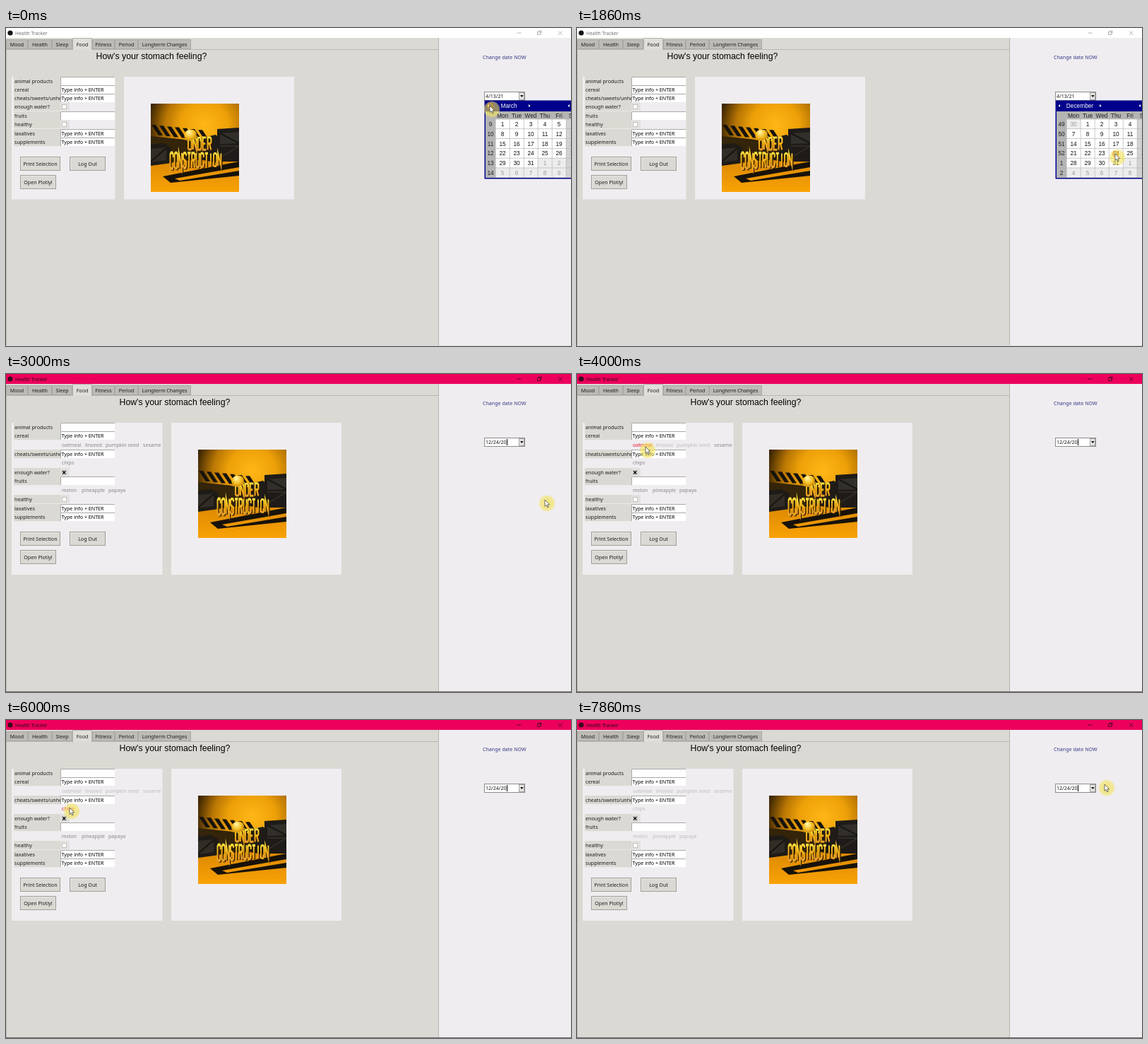
Write an HTML page with a canvas that moves like this. It is 800 by 450 pixels and loops after 8 s.

```html
<!DOCTYPE html>
<html lang="en">
<head>
<meta charset="utf-8">
<title>Health Tracker</title>
<style>
  html, body { margin: 0; width: 100%; height: 100%; overflow: hidden; background: #efedf0; }
  canvas { display: block; }
</style>
</head>
<body>
<canvas id="stage" width="800" height="450"></canvas>
<script>
const ctx = document.getElementById('stage').getContext('2d');
const LOOP = 8000, STEPS_PER_SECOND = 7;
const DATE_CHOSEN = 18;
const UI = '"Noto Sans", "Open Sans", sans-serif';
const ARIAL = '"Liberation Sans", Arial, sans-serif';
const GREY = '#dad9d3', PANEL = '#efedf0', INK = '#1c1c1c', NAVY = '#00008b';

function rect(x, y, w, h, fill, border) {
  ctx.fillStyle = fill;
  ctx.fillRect(x, y, w, h);
  if (border) {
    ctx.strokeStyle = border;
    ctx.lineWidth = 1;
    ctx.strokeRect(x + .5, y + .5, w - 1, h - 1);
  }
}

// y is the vertical middle of the capitals
function text(str, x, y, { size = 7.1, color = INK, align = 'left', family = UI } = {}) {
  ctx.font = `${size}px ${family}`;
  ctx.textAlign = align;
  ctx.fillStyle = color;
  ctx.fillText(str, x, y + size * .36);
}

function poly(points, fill) {
  ctx.beginPath();
  for (let i = 0; i < points.length; i += 2) ctx.lineTo(points[i], points[i + 1]);
  ctx.closePath();
  ctx.fillStyle = fill;
  ctx.fill();
}

function line(points, color, width = 1) {
  ctx.beginPath();
  for (let i = 0; i < points.length; i += 2) ctx.lineTo(points[i], points[i + 1]);
  ctx.strokeStyle = color;
  ctx.lineWidth = width;
  ctx.stroke();
}

// Pointer tip: [step, x, y]
const route = [
  [0, 685, 110], [8, 685, 110], [11, 768, 182], [13, 762, 178], [21, 763, 178],
  [24, 262, 122], [25, 165, 102], [26, 125, 103], [28, 97, 103], [32, 97, 103],
  [33, 125, 103], [34, 160, 104], [36, 191, 107], [38, 191, 107], [40, 92, 124],
  [42, 90, 124], [44, 90, 161], [45, 95, 161], [46, 122, 161], [47, 152, 161],
  [49, 162, 161], [53, 755, 105], [55, 747, 91]
];

function pointerAt(step) {
  const next = route.findIndex(key => key[0] >= step);
  if (next <= 0) return route[0].slice(1);
  const [s0, x0, y0] = route[next - 1], [s1, x1, y1] = route[next];
  const k = (step - s0) / (s1 - s0), ease = k * k * (3 - 2 * k);
  return [x0 + (x1 - x0) * ease, y0 + (y1 - y0) * ease];
}

// Words offered below the entries: [word, left, right, middle]
const words = [
  ['oatmeal', 79, 106, 100], ['linseed', 112, 136, 100],
  ['pumpkin seed', 141, 188, 100], ['sesame', 194, 219, 100],
  ['chips', 79, 97, 125],
  ['melon', 79, 100, 164], ['pineapple', 107, 139, 164], ['papaya', 145, 169, 164]
];

// Hovered words are red, and stay pale once left
function wordColor([, left, right, mid], step) {
  const hit = s => {
    const [x, y] = pointerAt(s);
    return x >= left - 3 && x <= right + 1 && Math.abs(y - mid) <= 7;
  };
  if (hit(step)) return '#e8102c';
  for (let s = DATE_CHOSEN; s < step; s++) if (hit(s)) return '#bdbcbe';
  return '#878689';
}

function drawWindow(active) {
  rect(0, 0, 800, 450, PANEL);
  rect(0, 0, 800, 14, active ? '#ec005c' : '#ffffff');
  const color = active ? '#3c0a1e' : '#a4a4a4';
  ctx.beginPath();
  ctx.arc(6, 7, 3.6, 0, 7);
  ctx.fillStyle = active ? '#3a0a1c' : '#111111';
  ctx.fill();
  text('Health Tracker', 13, 7.5, { size: 6.7, color: active ? '#2c0815' : '#707070' });
  line([723.5, 7, 729.5, 7], color, .8);
  ctx.lineWidth = .8;
  ctx.strokeRect(752.5, 5.5, 4, 4);
  line([754, 4, 758, 4, 758, 8], color, .8);
  line([782, 4.5, 787.5, 10], color, .8);
  line([787.5, 4.5, 782, 10], color, .8);

  rect(0, 14, 613, 436, GREY);
  line([612.5, 14, 612.5, 449], '#b5b4af');
  line([0.5, 449, 0.5, 30.5, 612, 30.5], '#b9b7b1');
  const tabs = [['Mood', 0], ['Health', 31], ['Sleep', 65], ['Food', 94],
    ['Fitness', 122], ['Period', 154], ['Longterm Changes', 187], ['', 262]];
  tabs.slice(0, -1).forEach(([name, x], i) => {
    const open = name === 'Food', w = tabs[i + 1][1] - x;
    rect(x, open ? 14 : 16, w, open ? 17 : 14, open ? '#dfded9' : '#bdbbb5', open ? null : '#aaa8a2');
    if (open) line([x + .5, 31, x + .5, 14.5, x + w - .5, 14.5, x + w - .5, 31], '#b3b1ab');
    text(name, x + w / 2, 23.5, { align: 'center' });
  });
  line([0, 449.5, 800, 449.5], active ? '#77656c' : '#e2e1e2');
}

// [label, kind, middle before, middle after]
const rows = [
  ['animal products', 'entry', 75, 75], ['cereal', 'hint', 87, 87],
  ['cheats/sweets/unhealthy', 'hint', 99, 113], ['enough water?', 'check', 111, 139],
  ['fruits', 'entry', 124, 151], ['healthy', 'check', 136, 177],
  ['laxatives', 'hint', 149, 190], ['supplements', 'hint', 161, 202]
];

function button(label, x, y, w) {
  rect(x, y, w, 20, GREY, '#a19f99');
  line([x + 1.5, y + 18, x + 1.5, y + 1.5, x + w - 2, y + 1.5], '#e6e5e0');
  text(label, x + w / 2, y + 10, { align: 'center' });
}

function drawForm(chosen, step) {
  text("How's your stomach feeling?", chosen ? 160.5 : 127.5, 40, { size: 12.3, family: ARIAL, color: '#000' });
  rect(8, 69, chosen ? 213.5 : 146.5, chosen ? 215 : 173.5, PANEL);
  for (const [label, kind, before, after] of rows) {
    const y = chosen ? after : before;
    ctx.save();
    ctx.beginPath();
    ctx.rect(11, y - 6, 66, 12.5);
    ctx.clip();
    rect(11, y - 6, 66, 12.5, GREY);
    text(label, 12, y);
    ctx.restore();
    if (kind === 'check') {
      rect(77, y - 6, 13, 12, '#e2e1df');
      rect(79, y - 3, 7, 7, '#fff', '#c2c1bd');
      if (chosen && label === 'enough water?') {
        line([80.3, y - 1.8, 84.3, y + 2.4], '#000', 1.5);
        line([84.3, y - 1.8, 80.3, y + 2.4], '#000', 1.5);
      }
    } else {
      rect(77, y - 6, 77, 12, '#fff');
      line([77.5, y + 6, 77.5, y - 5.5, 154, y - 5.5], '#aaa9a6');
      if (kind === 'hint') text('Type info + ENTER', 78.5, y, { color: '#000' });
    }
  }
  if (chosen) for (const word of words) text(word[0], word[1], word[3], { color: wordColor(word, step) });
  const top = chosen ? 223 : 182;
  button('Print Selection', 20, top, 57);
  button('Log Out', 90, top, 51);
  button('Open Plotly!', 20, top + 26, 51);
}

// Narrow block letters on a 4 x 10 grid
const glyphs = {
  U: 'M0 0V9L1 10H3L4 9V0', N: 'M0 10V0L4 10V0', D: 'M0 0V10H3L4 8V2L3 0Z',
  E: 'M4 0H0V10H4M0 5H3', R: 'M0 10V0H3L4 1V4L3 5H0M2 5L4 10',
  C: 'M4 3V1L3 0H1L0 1V9L1 10H3L4 9V7', O: 'M1 0H3L4 1V9L3 10H1L0 9V1Z',
  S: 'M4 2V1L3 0H1L0 1V4L4 6V9L3 10H1L0 9V8', T: 'M0 0H4M2 0V10', I: 'M2 0V10'
};

function blockWord(word, x, y, pitch, height, slope, shrink) {
  [...word].forEach((letter, i) => {
    const path = new Path2D(glyphs[letter]);
    for (const [dx, color] of [[1.2, '#2a1800'], [0, null]]) {
      ctx.save();
      ctx.translate(x + i * pitch + dx, y + i * slope + dx * .6);
      ctx.scale(pitch / 5.8, (height - i * shrink) / 10);
      const gold = ctx.createLinearGradient(0, 0, 0, 10);
      gold.addColorStop(0, '#ffdc3c');
      gold.addColorStop(.55, '#f0aa14');
      gold.addColorStop(1, '#e8a028');
      ctx.strokeStyle = color || gold;
      ctx.lineWidth = 1.75;
      ctx.stroke(path);
      ctx.restore();
    }
  });
}

function drawPicture(x, y) {
  ctx.save();
  ctx.translate(x, y);
  ctx.beginPath();
  ctx.rect(0, 0, 125, 125);
  ctx.clip();
  const wall = ctx.createRadialGradient(76, 30, 4, 76, 34, 90);
  [[0, '#fdb414'], [.35, '#eda008'], [.6, '#b87604'], [.85, '#4a2e02'], [1, '#1c1002']]
    .forEach(([at, color]) => wall.addColorStop(at, color));
  rect(0, 0, 125, 125, wall);

  // hazard stripes above a shaded wall
  for (let i = 0; i < 7; i++) {
    const sx = 1 + i * 11, sy = 30 + i * 1.2;
    poly([sx, sy, sx + 6, sy, sx + 16, sy + 15, sx + 10, sy + 15], '#17130c');
  }
  poly([0, 46, 78, 54, 96, 50, 96, 82, 0, 88], '#33240a');

  // floor
  const floor = ctx.createLinearGradient(0, 76, 0, 125);
  floor.addColorStop(0, '#d98602');
  floor.addColorStop(1, '#f9a206');
  poly([0, 87, 60, 80, 125, 80, 125, 125, 0, 125], floor);
  poly([17, 103, 125, 82, 125, 90, 34, 106, 41, 109, 125, 95, 125, 102, 28, 112], '#17120a');

  // crates
  poly([0, 58, 18, 56, 29, 62, 29, 84, 0, 88], '#1e1b17');
  poly([0, 64, 22, 62, 22, 80, 0, 83], '#312c25');
  line([0, 82, 22, 63], '#17140f', 2);
  poly([74, 48, 92, 44, 96, 48, 96, 84, 74, 80], '#1f1c18');
  poly([94, 36, 125, 34, 125, 82, 94, 82], '#1e1b18');
  poly([98, 42, 125, 40, 125, 56, 98, 57], '#322f2a');
  line([98, 42, 125, 56], '#191713', 2);
  line([98, 60, 125, 60, 99, 76], '#302c26', 2);

  blockWord('UNDER', 53, 49, 6.9, 16, -.3, -.4);
  blockWord('CONSTRUCTION', 27.5, 69.5, 6.15, 22.5, .1, .45);

  // hard hat
  const hat = ctx.createRadialGradient(54, 40, 1, 56, 44, 12);
  hat.addColorStop(0, '#fff3a0');
  hat.addColorStop(.5, '#f2b91f');
  hat.addColorStop(1, '#a96a00');
  ctx.fillStyle = hat;
  ctx.beginPath();
  ctx.ellipse(56, 44, 9, 7.5, -.25, 0, 7);
  ctx.fill();
  line([47, 50, 56, 52, 66, 46], '#d99a12', 2);
  ctx.restore();
}

const months = [[0, 'March', 2021, 2, 9], [2, 'February', 2021, 1, 5],
  [4, 'January', 2021, 0, 53], [7, 'December', 2020, 11, 49]];

function drawCalendar(step) {
  const [, name, year, month, week] = months.filter(m => m[0] <= step).pop();
  const label = { size: 8.3, family: ARIAL, align: 'center' };
  rect(677.5, 102.5, 122.5, 111, NAVY);
  text(name, 712, 110, { ...label, color: '#fff' });
  poly([684, 108, 684, 112, 681.5, 110], '#fff');
  poly([740, 108, 740, 112, 742.5, 110], '#fff');
  poly([798, 108, 798, 112, 795.5, 110], '#fff');
  rect(679, 118, 121, 94, '#b4b4b4');
  ['Mon', 'Tue', 'Wed', 'Thu', 'Fri', 'Sat'].forEach((day, col) =>
    text(day, 703 + col * 20, 123.7, { ...label, color: '#202020' }));
  const first = new Date(Date.UTC(year, month, 1));
  const lead = (first.getUTCDay() + 6) % 7;
  for (let row = 0; row < 6; row++) {
    const y = 129.3 + row * 13.8;
    text((week + row - 1) % 52 + 1, 686, y + 6.7, { ...label, color: '#202020' });
    for (let col = 0; col < 6; col++) {
      const date = new Date(Date.UTC(year, month, 1 - lead + row * 7 + col));
      const inside = date.getUTCMonth() === month, weekend = col === 5;
      rect(693.5 + col * 20, y, 19.3, 13.1, weekend ? '#d2d2d2' : inside ? '#fff' : '#ededed');
      text(date.getUTCDate(), 703 + col * 20, y + 6.7,
        { ...label, color: inside && !weekend ? '#101010' : '#999' });
    }
  }
}

function drawDate(chosen, time) {
  text('Change date NOW', 675, 41.3, { color: '#3a3a86' });
  rect(677, 90, 58, 13, '#fff', '#8c8c8c');
  rect(726, 91, 8, 11, '#e5e4e2', '#a5a4a2');
  poly([728, 95, 732.6, 95, 730.3, 98], '#111');
  text(chosen ? '12/24/20' : '4/13/21', 679, 96.5);
  if (chosen && (time + 820) % 900 < 600) line([709.5, 92, 709.5, 101], '#000');
}

function drawPointer(step) {
  const [x, y] = pointerAt(step);
  const click = [0, 2, 4, 7, 13].includes(step);
  ctx.save();
  ctx.translate(x, y);
  const halo = ctx.createRadialGradient(3, 5, 0, 3, 5, 12);
  halo.addColorStop(0, 'rgba(240,222,60,.65)');
  halo.addColorStop(.85, 'rgba(243,228,95,.58)');
  halo.addColorStop(1, 'rgba(243,228,100,0)');
  rect(-10, -8, 26, 26, halo);
  if (click) {
    ctx.beginPath();
    ctx.arc(.5, .5, 3.6, 0, 7);
    ctx.strokeStyle = 'rgba(236,160,40,.75)';
    ctx.lineWidth = 1.5;
    ctx.stroke();
  }
  poly([0, 0, 0, 9.3, 2.2, 7.4, 3.7, 10.8, 5.2, 10.1, 3.7, 6.9, 6.6, 6.7], '#fff');
  ctx.strokeStyle = '#333';
  ctx.lineWidth = .7;
  ctx.stroke();
  ctx.restore();
}

function draw(now) {
  const time = now % LOOP;
  const step = Math.min(55, Math.floor((time + 5) * STEPS_PER_SECOND / 1000));
  const chosen = step >= DATE_CHOSEN;
  drawWindow(chosen);
  drawForm(chosen, step);
  const shift = chosen ? 67 : 0;
  rect(167 + shift, 69, 241, chosen ? 215 : 173.5, PANEL);
  drawPicture(205 + shift, 107);
  drawDate(chosen, time);
  if (!chosen) drawCalendar(step);
  drawPointer(step);
}

const start = performance.now();
function tick() {
  draw(performance.now() - start);
  requestAnimationFrame(tick);
}
tick();
</script>
</body>
</html>
```
